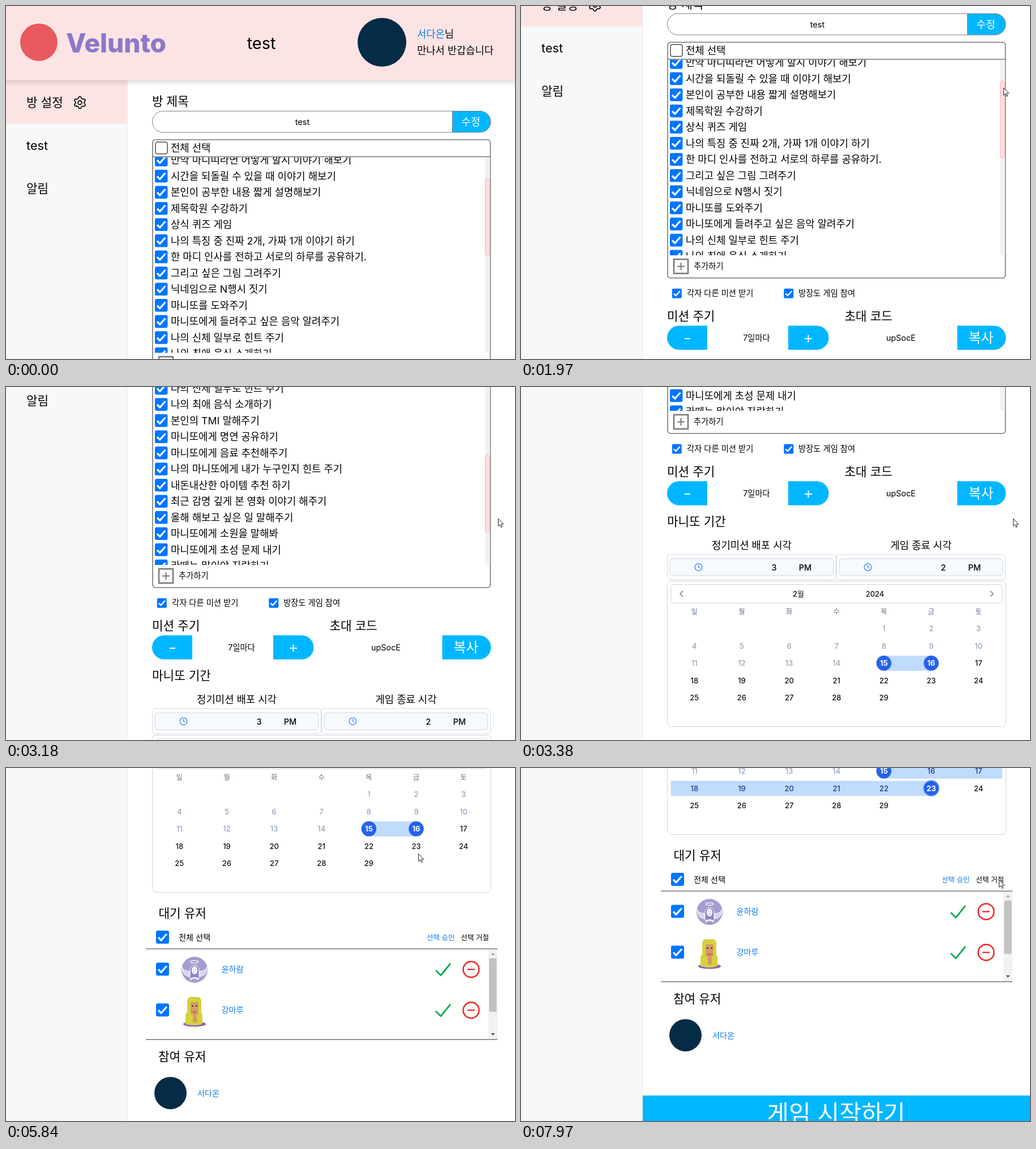
These frames come from a looping animation (899x623 px, 8 s). An HTML page:

```html
<!DOCTYPE html>
<html lang="ko">
<head>
<meta charset="utf-8">
<title>방 설정</title>
<style>
html, body { margin: 0; width: 100%; height: 100%; overflow: hidden; background: #fff; }
svg { display: block; font-family: Inter, 'Noto Sans CJK KR', 'Noto Sans CJK', sans-serif; }
#header { filter: drop-shadow(0 2px 6px #0003); }
</style>
</head>
<body>
<svg id="stage" width="899" height="623" viewBox="0 0 899 623"></svg>
<script>
const SKY = '#00b7ff', BLUE = '#0b7cf0', PINK = '#fde4e4', GRAY = '#767676';
const LOOP = 8000, STEP = 66.5, START = 1050;
const HOST = '서다온', GUESTS = ['윤하람', '강마루'];
const MISSIONS = ['만약 마니띠라면 어떻게 할지 이야기 해보기', '시간을 되돌릴 수 있을 때 이야기 해보기',
  '본인이 공부한 내용 짧게 설명해보기', '제목학원 수강하기', '상식 퀴즈 게임',
  '나의 특징 중 진짜 2개, 가짜 1개 이야기 하기', '한 마디 인사를 전하고 서로의 하루를 공유하기.',
  '그리고 싶은 그림 그려주기', '닉네임으로 N행시 짓기', '마니또를 도와주기',
  '마니또에게 들려주고 싶은 음악 알려주기', '나의 신체 일부로 힌트 주기', '나의 최애 음식 소개하기',
  '본인의 TMI 말해주기', '마니또에게 명연 공유하기', '마니또에게 음료 추천해주기',
  '나의 마니또에게 내가 누구인지 힌트 주기', '내돈내산한 아이템 추천 하기',
  '최근 감명 깊게 본 영화 이야기 해주기', '올해 해보고 싶은 일 말해주기', '마니또에게 소원을 말해봐',
  '마니또에게 초성 문제 내기', '라떼는 말이야 자랑하기'];

// Drawing helpers; text is placed by its vertical centre, its baseline on a whole pixel
const text = (x, y, size, s, fill = '#000', anchor = 'start', weight = 400) =>
  `<text x="${x}" y="${Math.round(y + size * .38)}" font-size="${size}" fill="${fill}" text-anchor="${anchor}" font-weight="${weight}">${s}</text>`;
const mid = (x, y, size, s, fill, weight) => text(x, y, size, s, fill, 'middle', weight);
const rect = (x, y, w, h, fill, r = 0, stroke = 'none', sw = 1) =>
  `<rect x="${x}" y="${y}" width="${w}" height="${h}" rx="${r}" fill="${fill}" stroke="${stroke}" stroke-width="${sw}"/>`;
const circle = (x, y, r, fill, stroke = 'none', sw = 1) =>
  `<circle cx="${x}" cy="${y}" r="${r}" fill="${fill}" stroke="${stroke}" stroke-width="${sw}"/>`;
const path = (d, stroke, sw = 1, fill = 'none') =>
  `<path d="${d}" fill="${fill}" stroke="${stroke}" stroke-width="${sw}" stroke-linejoin="round"/>`;
const check = (x, y, s) => rect(x - s / 2, y - s / 2, s, s, '#0075ff', s * .13) +
  path(`M${x - s * .32} ${y + s * .02}l${s * .21} ${s * .22}l${s * .43} ${-s * .48}`, '#fff', s * .14);
const cap = (x, y, w, h, left) => {
  const r = h / 2;
  return path(left ? `M${x + w} ${y}v${h}h${r - w}a${r} ${r} 0 0 1 0 ${-h}z`
    : `M${x} ${y}h${w - r}a${r} ${r} 0 0 1 0 ${h}h${r - w}z`, 'none', 0, SKY);
};

function gear(x, y) {
  let d = '';
  for (let i = 0; i < 24; i++) {
    const a = (i - 1.5) * Math.PI / 12, r = i % 4 == 1 || i % 4 == 2 ? 10.5 : 7.8;
    d += `${i ? 'L' : 'M'}${x + r * Math.sin(a)} ${y - r * Math.cos(a)}`;
  }
  return path(d + 'z', '#111', 1.8) + circle(x, y, 3.5, 'none', '#111', 1.8);
}

const sidebar = () => rect(0, 131, 214.5, 1700, '#f7f8f8') + rect(214, 131, 1, 1700, '#fbe3df') +
  rect(0, 131, 215, 77, PINK) + text(36, 170, 21.3, '방 설정') + gear(130.5, 170.5) +
  text(36, 246, 21.7, 'test') + text(36, 322, 21.3, '알림');

const header = () => `<g id="header">${rect(-10, -20, 919, 151, PINK)}</g>` +
  circle(58, 64, 33, '#e8595f') + text(106, 65, 46, 'Velunto', '#8c78c8', 'start', 800) +
  mid(451, 65, 28.9, 'test') + circle(664, 64, 43, '#062b47') +
  text(726, 49, 17.7, `<tspan fill="${BLUE}">${HOST}</tspan>님`) +
  text(726, 78, 17.7, '만나서 반갑습니다');

const missionBox = () => text(258, 168, 21.3, '방 제목') + cap(788, 185.5, 68, 37.5) +
  rect(258.5, 185.5, 597.5, 37.5, 'none', 18.7, '#808080') +
  path('M788.5 185v38', '#777') + mid(523.5, 204, 14.5, 'test') + mid(821, 204, 18.3, '수정', '#fff') +
  rect(259, 236, 596.5, 416, '#fff', 5, GRAY, 1.6) + path('M259 266h596', GRAY, 1.6) +
  rect(264, 240, 21, 21, '#fff', 3.5, GRAY, 2) + text(291, 250, 17.8, '전체 선택') +
  `<g clip-path="url(#view)"><g id="list">${MISSIONS.map((s, i) => {
    const y = 271.3 + 28.5 * i;
    return check(274.2, y + .4, 22.5) + text(291, y, 17.8, s);
  }).join('')}</g></g>` +
  rect(846, 267, 9, 345, '#f1f1f1', 4) +
  `<g id="thumb">${rect(846.5, 304.5, 8, 136, '#fddfe0', 4, '#f3bcc0', 1.2)}</g>` +
  rect(270, 619, 25, 25, '#fff', 0, GRAY, 2.5) + path('M276 631.5h13m-6.5-6.5v13', GRAY, 2) +
  text(305, 631, 14.3, '추가하기');

const options = () => check(275.3, 679.2, 17) + text(293, 679, 14.3, '각자 다른 미션 받기') +
  check(472.8, 679.2, 17) + text(490, 679, 14.3, '방장도 게임 참여') +
  text(258, 719, 21.3, '미션 주기') + text(571.5, 719, 21.3, '초대 코드') +
  cap(258, 736.2, 71, 42.6, true) + cap(472, 736.2, 71.5, 42.6) + cap(770.5, 736.2, 86, 42.6) +
  path('M289 759h10', '#fff', 2) + path('M501 759h13m-6.5-6.5v13', '#fff', 2) +
  mid(416, 757.5, 14.3, '7일마다') + mid(671, 757.5, 14.4, 'upSocE') +
  mid(812.5, 757, 23.9, '복사', '#fff') + text(258, 807, 21.3, '마니또 기간');

const clock = (x, title, hour) => mid(x + 149, 849, 17.8, title) +
  rect(x, 865.5, 298, 44.5, '#fff', 5, '#d3d8df') +
  rect(x + 4.5, 873, 289, 30, '#f6fafd', 5, '#cbd5e1') +
  circle(x + 55, 888, 6.3, 'none', '#3b82f6', 1.3) + path(`M${x + 55} 884v4l2.7 1.7`, '#3b82f6', 1.3) +
  mid(x + 188.5, 888, 14.5, hour, '#000', 500) + mid(x + 243.5, 888, 14.5, 'PM', '#000', 500);

const dayX = i => 306.3 + 83.65 * i;
const rowY = r => 996.5 + 30.4 * r;
const calendar = () => rect(258.5, 912.5, 598, 257, '#fff', 7, '#cfd4dd') +
  rect(265, 918.5, 585, 33, '#fff', 5, '#d1d5db') +
  mid(490, 935, 13, '2월', '#111', 500) + mid(625, 935, 13, '2024', '#111', 500) +
  path('M286 930l-5 5 5 5M829 930l5 5-5 5', '#64748b', 1.4) +
  [...'일월화수목금토'].map((s, i) => mid(dayX(i), 966, 12.4, s, '#64748b', 500)).join('') +
  '<g id="days"></g>';

function days(end, solid) {
  let bands = '', out = '';
  for (let r = 0; r < 5; r++) {
    const first = r * 7 - 3, a = Math.max(15, first), b = Math.min(end, first + 6);
    if (a <= b) {
      const x1 = a > 15 ? 264.5 : dayX(15 - first), x2 = b < end ? 850 : dayX(end - first);
      bands += rect(x1, rowY(r) - 13, x2 - x1, 26.5, '#bfdbfe');
    }
    for (let i = 0; i < 7; i++) {
      const d = first + i, x = dayX(i), y = rowY(r), edge = d == 15 || d == end;
      if (d < 1 || d > 29) continue;
      if (edge) {
        if (solid && d == 23) out += circle(x, y, 15, '#a9c8fb');
        out += solid ? circle(x, y, 13.3, '#2563eb') : circle(x, y, 12.5, d == 15 ? '#fff' : '#dbeafe', '#2563eb', 1.5);
      }
      const fill = edge ? (solid ? '#fff' : '#1e40af') : d < 15 ? '#94a3b8' : d < end ? '#1e3a8a' : '#0b0f19';
      out += mid(x, y, 13, d, fill, edge && solid ? 700 : 500);
    }
  }
  return bands + out;
}

const angel = y => circle(333, y, 23, '#a59dd0') +
  `<ellipse cx="333" cy="${y - 14}" rx="7" ry="2.2" fill="none" stroke="#fff" stroke-width="1.3"/>` +
  path(`M324 ${y + 3}q-12-1-13-8q0 16 13 17zM342 ${y + 3}q12-1 13-8q0 16-13 17z`, '#fff', 1, '#d8d3ec') +
  path(`M325 ${y + 15}v-14a8 9 0 0 1 16 0v14z`, '#fff', 1, '#8f86c2') +
  `<ellipse cx="333" cy="${y + 1}" rx="5" ry="7" fill="#fff"/>` +
  path(`M330 ${y}h2m2 0h2M331 ${y + 4}h4`, '#8f86c2', 1) +
  path(`M326 ${y + 18}q7-8 14 0`, '#fff', 2);

const girl = y => `<ellipse cx="333" cy="${y + 22}" rx="20" ry="4.5" fill="#8a5fc0"/>` +
  rect(320, y - 26, 25, 50, '#d5d23e', 7) + rect(317, y + 2, 30, 21, '#d5d23e', 4) +
  rect(326, y - 17, 14, 22, '#d69a62', 2) + rect(330, y + 5, 7, 14, '#d69a62') +
  rect(328, y - 11, 3, 2, '#333') + rect(335, y - 11, 3, 2, '#333') + rect(330, y, 6, 2, '#b7478c');

const guest = (name, y) => check(276.5, y, 23) + text(380.5, y, 14.2, name, BLUE) +
  path(`M759 ${y + 2}l9 9 17-21`, '#0bab50', 2.8) +
  circle(821.5, y + .5, 14, 'none', '#f32424', 2.5) + path(`M815 ${y + .5}h13`, '#f32424', 2.3);

const users = () => text(269.5, 1205.5, 21.3, '대기 유저') + check(276.5, 1248.5, 23) +
  text(305, 1249, 14.2, '전체 선택') + text(743, 1249, 12.5, '선택 승인', BLUE) + text(803.5, 1249, 12.5, '선택 거절') +
  guest(GUESTS[0], 1305) + guest(GUESTS[1], 1377) + angel(1306) + girl(1380) +
  rect(852, 1270, 16, 159, '#f1f1f1') + rect(853.5, 1286, 13, 94, '#c1c1c1') +
  path('M856.5 1280h7l-3.5-4z', 'none', 0, '#a3a3a3') + path('M856.5 1418h7l-3.5 4z', 'none', 0, '#505050') +
  path('M247 1269.3h621M247 1429.3h621', GRAY, 1.6) +
  text(269, 1459, 21.3, '참여 유저') + circle(290.5, 1523.7, 28.5, '#062b47') +
  text(338, 1524, 14.2, HOST, BLUE) +
  rect(215, 1630, 684, 64, SKY) + mid(556.5, 1661, 42.2, '게임 시작하기', '#fff');

const arrow = path('M.5 .5v13l3-2.7 2.2 4.8 2-.9-2.1-4.7h4.2z', '#222', 1, '#fff');
const hand = path('M-1.5 9.5V1.5q1.5-2 3 0V7q2.2-1 3 .7q2-.7 2.7 1q2.2-.5 2.3 1.5q0 5-2.5 8.8h-7q-3-4-5.5-8q1-1.8 4 .8zM1.5 7v3M4.500 8v2.5M7.2 9v2', '#111', 1, '#fff');

stage.innerHTML = `<clipPath id="view"><rect x="260" y="267" width="585" height="345"/></clipPath>
  <g id="page">${sidebar() + missionBox() + options() + clock(258.5, '정기미션 배포 시각', 3) +
  clock(557.5, '게임 종료 시각', 2) + calendar() + users() + header()}</g>
  <g id="arrow">${arrow}</g><g id="hand">${hand}</g>`;

// Linear interpolation through [time, value] points
function track(t, keys) {
  let [t0, v0] = keys[0];
  if (t <= t0) return v0;
  for (const [t1, v1] of keys) {
    if (t < t1) return v0 + (v1 - v0) * (t - t0) / (t1 - t0);
    [t0, v0] = [t1, v1];
  }
  return v0;
}

const SCROLL = [[1715, 0], [1781, 2], [1848, 62], [1914, 128], [1981, 172], [2048, 190],
  [3045, 190], [3112, 218], [3178, 298], [3245, 420], [3311, 520], [3378, 570],
  [3976, 570], [4042, 625], [4109, 765], [4175, 895], [4242, 950],
  [7832, 950], [7899, 972], [7966, 1052]];
const LIST = [[2246, 0], [2513, 131], [2912, 285]];
const POINTER_X = [[983, 900], [1781, 850], [2048, 853], [2513, 853], [2912, 855], [3045, 869],
  [5306, 869], [6171, 639], [6437, 639], [6770, 721], [7240, 721], [7830, 844]];
const POINTER_Y = [[983, 320], [1781, 169], [2048, 136], [2246, 136], [2513, 188], [2912, 250], [3045, 232],
  [5306, 232], [6171, 100], [6437, 100], [6770, 120], [6836, 120], [6903, 131], [7240, 131], [7830, 197]];

const $ = id => document.getElementById(id);
const move = (id, x, y) => $(id).setAttribute('transform', `translate(${Math.round(x)} ${Math.round(y)})`);
let shown = '';

function draw() {
  const now = performance.now() % LOOP;
  const t = START + STEP * Math.floor((now - START) / STEP + .2);
  const x = track(t, POINTER_X), y = track(t, POINTER_Y), list = track(t, LIST);
  move('page', 0, -track(t, SCROLL));
  move('list', 0, -list);
  move('thumb', 0, list * .4);

  const pointing = t > 5970 && t < 7400;
  move('arrow', x, y);
  move('hand', x, y);
  $('arrow').style.display = t < START - 1 || pointing ? 'none' : '';
  $('hand').style.display = pointing ? '' : 'none';

  const solid = t < 6230 || t > 7030;
  const end = t < 6230 ? 16 : t > 6890 ? 23 : x > 683 ? 16 : 15;
  if (shown != end + '/' + solid) {
    shown = end + '/' + solid;
    $('days').innerHTML = days(end, solid);
  }
  requestAnimationFrame(draw);
}
draw();
</script>
</body>
</html>
```
